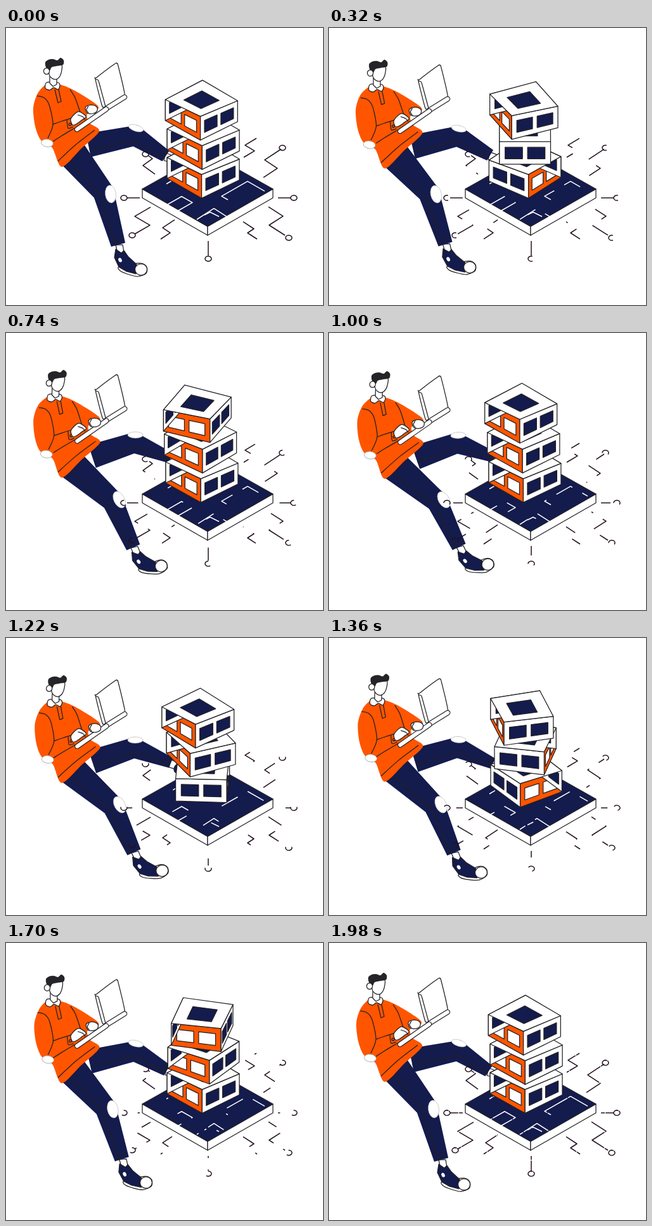
An HTML page with a canvas that plays this animation: 500 px wide and 437 px high, repeating every 2000 ms.

```html
<!DOCTYPE html>
<html lang="en">
<head>
<meta charset="utf-8">
<title>Building blocks</title>
<style>
html, body { margin: 0; width: 100%; height: 100%; overflow: hidden; background: #fff; }
canvas { display: block; width: 500px; height: 437px; }
</style>
</head>
<body>
<canvas id="stage" width="500" height="437"></canvas>
<script>
const ctx = document.getElementById('stage').getContext('2d');
const LOOP = 2000, TAU = Math.PI * 2;
const NAVY = '#141b4d', ORANGE = '#ff5500', INK = '#222024', WHITE = '#fff', WIRE = '#23101f';
const ease = v => (1 - Math.cos(Math.PI * Math.max(0, Math.min(1, v)))) / 2;

// pose runs from 0 (upright) to about 1 (leaning back)
let pose = 0;
const between = (a, b) => a.map((v, i) => v + (b[i] - v) * pose);

function paint(fill, stroke, width = 1.25) {
  if (fill) { ctx.fillStyle = fill; ctx.fill(); }
  if (stroke) { ctx.strokeStyle = stroke; ctx.lineWidth = width; ctx.stroke(); }
}
function poly(p, fill, stroke, width, open) {
  ctx.beginPath();
  for (let i = 0; i < p.length; i += 2) ctx.lineTo(p[i], p[i + 1]);
  if (!open) ctx.closePath();
  paint(fill, stroke, width);
}
// smooth curve through the points
function blob(p, fill, stroke, open) {
  const n = p.length / 2, k = 0.14;
  const at = i => {
    const j = open ? Math.max(0, Math.min(n - 1, i)) : (i + n) % n;
    return [p[2 * j], p[2 * j + 1]];
  };
  ctx.beginPath();
  ctx.moveTo(p[0], p[1]);
  for (let i = 0; i < (open ? n - 1 : n); i++) {
    const [a, b, c, d] = [i - 1, i, i + 1, i + 2].map(at);
    ctx.bezierCurveTo(b[0] + (c[0] - a[0]) * k, b[1] + (c[1] - a[1]) * k,
      c[0] - (d[0] - b[0]) * k, c[1] - (d[1] - b[1]) * k, c[0], c[1]);
  }
  if (!open) ctx.closePath();
  paint(fill, stroke);
}
const line = p => blob(p, null, INK, true);
function oval(x, y, rx, ry, fill, stroke, turn = 0, width) {
  ctx.beginPath();
  ctx.ellipse(x, y, rx, ry, turn, 0, TAU);
  paint(fill, stroke, width);
}
function within(setup, draw) {
  ctx.save();
  setup();
  draw();
  ctx.restore();
}

// ---- circuit ----
// zigzag: each step keeps the slope but flips its sign
function zigzag(x, y, slope, ...steps) {
  const p = [x, y];
  steps.forEach((s, i) => p.push(x += s, y += s * (i % 2 ? -slope : slope)));
  return p;
}
const wires = [
  zigzag(434, 191, -0.66, -26, 20, -22),
  zigzag(440, 327, 0.64, -25, 22, -23),
  zigzag(203, 325, -0.58, 24, -24, 25),
  zigzag(395, 174, -0.6, -18, 15, -17),
  zigzag(396, 333, 0.65, -15, 10, -17),
  zigzag(244, 333, -0.66, 15, -12, 19),
  zigzag(224, 201, 0.72, 7, -15, 19),
  zigzag(429, 268, 0, 20),
  zigzag(211, 268, 0, -20),
  [319, 336, 319, 359]
];
const nodes = [[436, 189], [454, 268], [446, 331], [319, 364], [199, 327], [186, 268], [220, 199]];
const traces = [
  zigzag(350, 271, 0.57, -10, 41, 27),
  zigzag(252, 280, -0.57, 25, 17, -22),
  zigzag(301, 302, -0.64, 27, 25, -12),
  zigzag(313, 295, -0.5, 9, 14),
  zigzag(253, 246, -0.6, 17)
];
const opening = t => Math.min(1, 2.2 * Math.sin(Math.PI * t / LOOP));
const cycle = t => (t - 320) / 400;

function dashed(list, t, color) {
  const gap = 18 * opening(t);
  ctx.setLineDash(gap > 0.7 ? [47 - gap, gap] : []);
  ctx.lineDashOffset = -47 * cycle(t);
  for (const p of list) poly(p, null, color, 1.5, true);
  ctx.setLineDash([]);
}
function circuit(t) {
  dashed(wires, t, WIRE);
  const mid = -TAU * cycle(t), half = 1.2 * opening(t);
  for (const [x, y] of nodes) {
    ctx.beginPath();
    ctx.ellipse(x, y, 5, 4, 0, mid + half, mid + TAU - half);
    paint(null, WIRE, 1.5);
  }
}
function platform(t) {
  for (const x of [215, 421]) poly([x, 254, 318, 313, 318, 327, x, 268], WHITE, INK);
  poly([215, 254, 318, 196, 421, 254, 318, 313], NAVY, INK);
  dashed(traces, t, WHITE);
}

// ---- blocks ----
const blocks = [
  { x: 310, y: 205, sway: 1.5, delay: -0.03 },
  { x: 309, y: 159, sway: 3, delay: 0.08 },
  { x: 305.5, y: 112.3, sway: 4, delay: 0.17 }
];
function block({ x, y, sway, delay }, t) {
  const time = t / 1000 - delay, half = Math.floor(time);
  const spin = Math.PI * (half + ease((time - half) / 0.74));
  const lean = Math.PI / 4 - spin;
  const cx = x + sway * Math.sin(lean), cy = y + 0.55 * sway * Math.cos(lean);
  const corner = i => -0.03 - spin + i * Math.PI / 2;
  const top = (a, r = 1) => {
    const z = r * Math.cos(a);
    return [cx + 57 * r * Math.sin(a), cy + 28.5 * z - 3 * z * z];
  };
  const base = a => [cx + 57 * Math.sin(a), cy + 33 + 30 * Math.cos(a)];
  function face(i) {
    const a = corner(i), c = corner(i + 1), warm = i % 2;
    const tl = top(a), tr = top(c), bl = base(a), br = base(c);
    const at = (u, v) => [0, 1].map(k =>
      (tl[k] * (1 - u) + tr[k] * u) * (1 - v) + (bl[k] * (1 - u) + br[k] * u) * v);
    const panel = (l, r, t, b, fill) =>
      poly([...at(l, t), ...at(r, t), ...at(r, b), ...at(l, b)], fill, INK);
    panel(0, 1, 0, 1, warm ? ORANGE : WHITE);
    for (const u of [0.11, 0.55]) panel(u, u + 0.34, 0.25, 0.76, warm ? WHITE : NAVY);
  }
  const sides = [0, 1, 2, 3];
  const front = i => Math.cos(corner(i) + Math.PI / 4) > 0;
  const pale = i => i % 2 === 0;
  // the pale inner wall shows through the open top of the orange side
  sides.filter(i => !pale(i) && front(i)).forEach(face);
  sides.filter(i => pale(i) && !front(i)).forEach(face);
  sides.filter(i => pale(i) && front(i)).forEach(face);
  poly(sides.flatMap(i => top(corner(i))), WHITE, INK);
  poly(sides.flatMap(i => top(corner(i), 0.49)), NAVY, INK);
}

// ---- man ----
// two-part limb: joints hip, knee, foot with a half width at each
function leg(joints, widths) {
  const dir = (a, b) => Math.atan2(b[1] - a[1], b[0] - a[0]);
  const [hip, knee, foot] = joints;
  const d1 = dir(hip, knee), d2 = dir(knee, foot);
  const turns = [d1, (d1 + d2) / 2, d2];
  const edge = f => joints.map(([x, y], i) =>
    [x - Math.sin(turns[i]) * widths[i] * f, y + Math.cos(turns[i]) * widths[i] * f]);
  poly([...edge(1), ...edge(-1).reverse()].flat(), NAVY);
  poly(edge(0.4).flat(), null, INK, 1.25, true);
  const cuff = f => [0, 1].map(k => edge(f)[2][k] * 0.92 + edge(f)[1][k] * 0.08);
  poly([...cuff(0.4), ...cuff(-0.8)], null, INK, 1.25, true);
}
const patch = (x, y, rx, ry, turn) => oval(x, y, rx, ry, WHITE, '#aaa', turn, 0.6);

function farLeg() {
  const knee = between([204, 170], [203, 173]), foot = between([252, 202], [260, 197]);
  const [x, y] = foot;
  poly([x, y - 5, x + 10, y - 1, x + 7, y + 10, x - 3, y + 7], WHITE, INK);
  oval(x + 10, y + 9, 5, 7, NAVY, INK, 0.3);
  leg([between([130, 185], [136, 195]), knee, foot], [19, 17, between([10], [8.5])[0]]);
  patch(knee[0] + 1, knee[1] - 12, 12, 5, 0.3 * (1 - pose));
}
function shoe() {
  poly([-4, 0, 7, 0, 9, 12, -1, 14], WHITE, INK);
  blob([2, 34, 3, 41, 17, 47, 31, 50, 44, 45, 45, 35, 35, 29], WHITE, INK);
  poly([-4, 7, 5, 13, 9, 9, 16, 19, 29, 31, 26, 38, 28, 46, 13, 42, 1, 35, -6, 20], NAVY, INK);
  oval(36, 39, 9.5, 9, WHITE, INK);
  oval(3, 24, 2.6, 3.6, WHITE, null, -0.4);
}
function nearLeg() {
  const foot = between([177, 342], [201.5, 338]), knee = between([154, 260], [169, 266]);
  within(() => { ctx.translate(...foot); ctx.rotate(-0.24 * pose); }, shoe);
  leg([between([104, 198], [103, 208]), knee, foot], [24, 17, 11.5]);
  patch(knee[0] + 11 - pose, knee[1] + 2 - 5 * pose, 8.5, 14, -0.12 - 0.36 * pose);
}
function shirt(drift) {
  blob([64, 89, 84, 89, 103, 96, 124, 108, 143, 121, 145, 128, 128, 136, 132, 150, 147, 163, 118, 191,
    88, 219, 73, 189, 55 + drift, 177, 46 + drift, 155, 43 + drift, 126, 50 + drift, 103], ORANGE);
  oval(65 + drift, 181.5, 9.5, 6, WHITE, '#999', 0.15, 0.8);
  line([49, 107, 60, 110, 68, 121, 74, 152, 66, 174]);
  line([74, 152, 88, 147, 104, 142]);
  line([74, 179, 88, 170, 108, 158]);
  line([96, 145, 98, 158, 106, 156]);
  line([101, 97, 109, 110, 117, 133]);
  line([82, 210, 110, 184, 140, 161]);
  oval(101, 152, 1.8, 2, null, INK);
  poly([77, 97, 82, 118, 87, 116, 83, 97], null, INK, 1.25, true);
}
function head() {
  blob([64, 86, 62, 95, 69, 98, 75, 94, 82, 97, 85, 91, 82, 86], WHITE, INK);
  poly([69, 76, 69, 87, 74, 92, 80, 89, 80, 78], WHITE, INK, 1.25, true);
  blob([69, 60, 68, 73, 72, 79, 79, 81, 85, 76, 88, 66, 87, 58], WHITE, INK);
  blob([63, 62, 62, 54, 67, 50, 74, 49, 81, 51, 86, 47, 91, 51, 90, 58, 80, 60, 72, 62, 69, 67], '#252428');
  oval(64, 68, 4.6, 5, WHITE, INK);
}
function laptop() {
  blob([141, 81, 143, 78, 171, 57, 175, 56, 177, 60, 187, 103, 185, 107, 158, 124, 154, 125, 151, 121], WHITE, INK);
  line([141, 81, 145, 82, 147, 87, 157, 124]);
  ctx.lineCap = 'round';
  for (const bar of [[158, 127, 187, 109], [112, 160, 158, 128]]) {
    poly(bar, null, INK, 8.4, true);
    poly(bar, null, WHITE, 6, true);
  }
  ctx.lineCap = 'butt';
}
function hands() {
  blob([102, 144, 109, 135, 115, 132, 124, 137, 126, 141, 120, 145, 112, 151, 105, 153], WHITE, INK);
  line([113, 137, 121, 140, 125, 145]);
  ctx.translate(5 * pose, 2.5 * pose);
  blob([125, 126, 130, 122, 139, 122, 144, 126, 143, 132, 137, 135, 128, 134], WHITE, INK);
  line([130, 123, 127, 129, 130, 134]);
}
function man(t) {
  pose = ease(2 * t / LOOP);
  if (t > LOOP / 2) pose = ease(2 - 2 * t / LOOP);
  pose *= 1.15;
  farLeg();
  nearLeg();
  // the upper body sinks and leans, most at the head
  within(() => ctx.transform(1, 0, -0.028 * pose, 1 - 0.0125 * pose, 6 * pose, 12.2 * pose), () => {
    shirt(-1.5 * Math.sin(TAU * t / LOOP) - pose);
    head();
  });
  within(() => ctx.translate(0.3 * pose, 10.8 * pose), () => {
    laptop();
    hands();
  });
}

function draw(now) {
  const t = now % LOOP;
  ctx.fillStyle = WHITE;
  ctx.fillRect(0, 0, 500, 437);
  ctx.lineJoin = 'round';
  platform(t);
  man(t);
  circuit(t);
  for (const b of blocks) block(b, t);
}
const start = performance.now();
function tick() {
  draw(performance.now() - start);
  requestAnimationFrame(tick);
}
tick();
</script>
</body>
</html>
```
